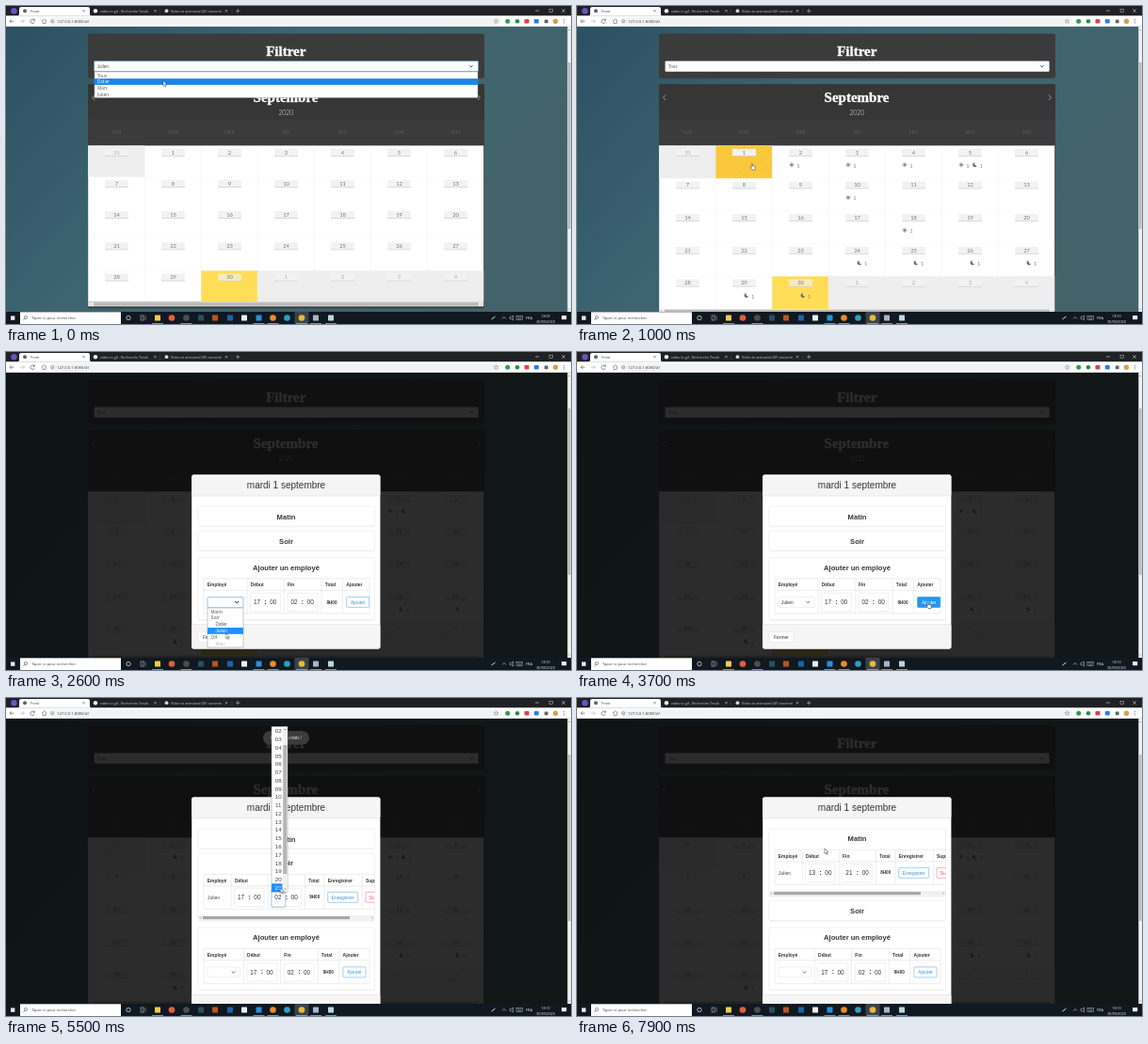
Write an HTML page that moves like this. It is 600x338 px and loops after 8 s.

```html
<!DOCTYPE html>
<html lang="fr">
<head>
<meta charset="utf-8">
<title>Front</title>
<style>
  html, body { margin: 0; width: 100%; height: 100%; overflow: hidden; background: #35545f; }
  svg { display: block; width: 600px; height: 338px; }
  text { font-family: "Open Sans", sans-serif; white-space: pre; }
  .cal text { font-family: Lato, sans-serif; }
  .cal .title { font-family: "Liberation Serif", serif; font-weight: 700; stroke: #fff; stroke-width: .35px; }
  .modal text, .pick text { font-family: "Liberation Sans", sans-serif; }
  #modal { transform-origin: 297.5px 223px; }
</style>
</head>
<body>
<svg id="stage" viewBox="0 0 600 338" xmlns="http://www.w3.org/2000/svg"></svg>
<script>
const LOOP = 8000;
const MID = 'text-anchor="middle"', BOLD = 'font-weight="700"';
const BLUE = '#1e90ff', LINK = '#3298dc', LINE = '#dbdbdb';
const people = { late: 'Julien', early: 'Didier', off: 'Marc' };

const rect = (x, y, w, h, fill, more = '') =>
  `<rect x="${x}" y="${y}" width="${w}" height="${h}" fill="${fill}" ${more}/>`;
const text = (x, y, s, size, fill, more = '') =>
  `<text x="${x}" y="${y}" font-size="${size}" fill="${fill}" ${more}>${s}</text>`;
const disc = (x, y, r, fill, more = '') => `<circle cx="${x}" cy="${y}" r="${r}" fill="${fill}" ${more}/>`;
const line = (d, color, w = 0.6, more = '') =>
  `<path d="${d}" fill="none" stroke="${color}" stroke-width="${w}" ${more}/>`;
const frame = (x, y, w, h, color, fill = 'none', more = '') =>
  rect(x, y, w, h, fill, `stroke="${color}" stroke-width=".45" ${more}`);
const cross = (x, y, r, color) => line(`M${x - r} ${y - r}l${2 * r} ${2 * r}m0 ${-2 * r}l${-2 * r} ${2 * r}`, color);
const chevron = (x, y, color) => line(`M${x - 1.8} ${y - 0.9}l1.8 1.8l1.8 -1.8`, color, 0.9);
const during = (a, b, body) => `<g data-on="${a} ${b}">${body}</g>`;

/* ---- browser window ---- */
function browser() {
  const pale = '#c4c7ca', grey = '#5f6368';
  let s = rect(0, 0, 600, 10.5, '#202124') + rect(0, 10.3, 600, 11.5, '#fff')
    + `<path d="M12 10.5q2 0 2-2v-5.5q0-2 2-2h71q2 0 2 2v5.5q0 2 2 2z" fill="#fff"/>`
    + disc(8.5, 5.2, 3.2, '#6b52c8') + disc(20, 5.2, 2, grey)
    + text(26, 6.7, 'Front', 3.8, '#3c4043')
    + disc(95, 5.2, 2.2, '#f0f0f0') + text(100, 6.7, 'video to gif - Recherche Trovik', 3.7, pale)
    + disc(170.5, 5.2, 1.9, '#d6d6d6') + text(175, 6.7, 'Video to animated GIF converte', 3.7, pale)
    + cross(82.5, 5.2, 1.2, grey) + cross(158.5, 5.2, 1.2, pale) + cross(234, 5.2, 1.2, pale)
    + line('M163.500 3v5M240 3v5', '#55585c', 0.4)
    + line('M244 5.200h4.400M246.200 3v4.400', pale)
    + line('M562 5h4', '#ddd') + frame(577, 3.2, 3.4, 3.4, '#ddd') + cross(592, 5, 1.7, '#ddd');
  s += line('M8.500 16.200h-4.500m2-2l-2 2l2 2', grey, 0.7)
    + line('M15 16.200h4.500m-2-2l2 2l-2 2', '#b8babd', 0.7)
    + line('M30 15a2.200 2.200 0 1 0 .3 2M30.400 13.500v1.800h-1.800', grey, 0.7)
    + line('M38 16l2.600-2.300l2.600 2.300M39 15.500v3h3.200v-3', grey, 0.6)
    + rect(46, 12, 480, 8.4, '#f1f3f4', 'rx="4.2"')
    + disc(49.3, 16.2, 1.6, 'none', `stroke="${grey}" stroke-width=".5"`) + line('M49.300 15.900v1.200', grey, 0.5)
    + text(54, 17.8, '127.0.0.1:8080/#/', 4.2, '#3c4043')
    + `<path d="M520.500 13.800l.7 1.600 1.700.1-1.300 1.100.4 1.700-1.500-.9-1.500.9.4-1.700-1.300-1.100 1.700-.1z" fill="none" stroke="${grey}" stroke-width=".4"/>`
    + disc(532.7, 16.2, 2.5, '#2f9e4c') + disc(543, 16.2, 2.3, '#2c8a45')
    + rect(550.500, 14, 5, 4.600, '#e0404a', 'rx="1"') + rect(560.8, 14, 5, 4.6, '#2d7cf0', 'rx="1"')
    + rect(571.8, 14.4, 3.8, 3.8, grey, 'rx=".6"') + disc(583.5, 16.2, 2.7, '#d2a24c')
    + [14.5, 16.2, 17.9].map(y => disc(592.5, y, 0.5, grey)).join('');
  return s;
}

/* ---- taskbar ---- */
function taskbar() {
  const pale = '#d9dde0';
  let s = rect(0, 325, 600, 13, '#101820') + rect(5, 329.4, 4.4, 4.4, '#e6eaed')
    + rect(15, 325.3, 107, 12.7, '#fff')
    + disc(21, 331, 1.6, 'none', 'stroke="#333" stroke-width=".5"') + line('M19.800 332.300l-1.400 1.500', '#333')
    + text(27, 333.3, 'Taper ici pour rechercher', 4.05, '#444')
    + disc(130, 331.5, 2.2, 'none', 'stroke="#eee" stroke-width=".7"')
    + frame(143, 330, 3.4, 3, pale) + line('M142.500 328.800h4.500M142.500 334.200h4.500M148.200 329v5', pale, 0.4)
    + rect(306.500, 325, 15, 13, '#39434c');
  const apps = [
    [161, '#f6c94c', 0], [176, '#e0603a', 1], [191.500, '#4a4d50', 1], [207, '#28505f', 0], [222, '#b8561f', 0],
    [238, '#1c64a8', 0], [253, '#e9eff2', 0], [268.500, '#2a8fd8', 0], [283.500, '#f28a24', 1], [298.500, '#2f9fc0', 1],
    [314, '#e8b93a', 1], [329, '#aab4c8', 0], [345, '#bcd6dc', 0]
  ];
  for (const [x, color, round] of apps)
    s += round ? disc(x, 331.5, 3.3, color) : rect(x - 3, 328.5, 6, 6, color, 'rx=".5"');
  for (const x of [161, 191.500, 268.500, 283.500, 314, 329, 345]) s += rect(x - 6, 337.2, 12, 0.8, '#76b9ed');
  s += line('M515.500 333l4-3', pale, 1) + line('M527 332.500l2-2l2 2', pale)
    + line('M535 330.300h2l1.500-1.300v5l-1.500-1.300h-2z', pale, 0.5)
    + frame(542, 329.6, 6.5, 3.8, pale) + line('M543 331h4.500M543.500 332.300h3.500', pale, 0.4)
    + text(552, 333, 'FRA', 3.9, '#eee')
    + during(0, 500, text(573, 330.6, '18:09', 3.7, '#eee', MID))
    + during(500, LOOP, text(573, 330.6, '18:10', 3.7, '#eee', MID))
    + text(573, 336.6, '30/09/2020', 3.7, '#eee', MID)
    + rect(590, 329, 5.2, 4.2, '#eee');
  return s;
}

/* ---- calendar page ---- */
const SIDE = 87.2, TOP = 148.5, WIDTH = 420;
const sun = (x, y) => disc(x, y, 1.5, '#8a8a8a')
  + disc(x, y, 2.1, 'none', 'stroke="#8a8a8a" stroke-width=".8" stroke-dasharray=".9 .75"');
const moon = (x, y) => `<path d="M${x} ${y - 2.5}a2.500 2.500 0 1 0 2.400 3.700a2.600 2.600 0 0 1 -2.400 -3.700z" fill="#6f6f6f"/>`;
const left = col => SIDE + 60 * col;

function shiftMark(cell, top, night, shift = 0) {
  const x = left(cell % 7) + (night ? 32.6 : 20.8) + shift, y = top + 20.3;
  return (night ? moon : sun)(x, y) + text(x + 5.4, y + 2.9, '1', 5, '#777');
}

function grid(pitch, marks) {
  const top = cell => TOP + pitch * Math.floor(cell / 7);
  let s = rect(SIDE, TOP, WIDTH, pitch * 5, '#fff');
  for (let i = 0; i < 35; i++) {
    const x = left(i % 7), y = top(i);
    const other = i === 0 || i > 30, today = i === 30;
    const n = i === 0 ? 31 : i > 30 ? i - 30 : i;
    if (other || today) s += rect(x, y, 60, pitch, today ? '#ffdd57' : '#eeeeee');
    if (i === 1 && marks) s += during(800, 1400, rect(x, y, 60, pitch, 'url(#stripes)'));
    s += line(`M${x} ${y}v${pitch}`, '#e4e4e4', 0.4) + line(`M${x} ${y}h60`, '#f2f2f2', 0.3)
      + rect(x + 17.8, y + 3.2, 25, 7.8, today ? '#f5eabf' : '#f2f2f2', 'rx=".8"')
      + rect(x + 17.8, y + 10.5, 25, 0.6, '#c9c9c9')
      + text(x + 30.3, y + 9.1, n, 5.8, other ? '#a9a9a9' : '#777', MID);
  }
  if (marks) {
    for (const i of [2, 3, 4, 5, 10, 18]) s += shiftMark(i, top(i), false);
    for (const i of [24, 25, 26, 27, 29, 30]) s += shiftMark(i, top(i), true);
    s += shiftMark(5, top(5), true, 2.6) + during(3800, 7500, shiftMark(1, top(1), true));
  }
  const end = TOP + pitch * 5;
  return s + rect(SIDE, end, WIDTH, 4.8, '#f1f1f1') + rect(93, end + 0.7, 409, 3.4, '#b9b9b9')
    + line(`M90.500 ${end + 1.4}l-1 1l1 1M504.500 ${end + 1.4}l1 1l-1 1`, '#777', 0.5);
}

function filterList() {
  const names = ['Tous', people.early, people.off, people.late];
  const row = i => 70.3 + 6.85 * i;
  const hot = (i, a, b) => during(a, b, rect(94, row(i), 407, 6.7, '#1a84e8') + text(97, row(i) + 5.2, names[i], 4.7, '#fff'));
  return frame(93.8, 58.6, 407.500, 11, '#3f8fe0') + frame(94, 70, 407, 27.5, '#999', '#fff')
    + names.map((n, i) => text(97, row(i) + 5.2, n, 4.7, '#555')).join('')
    + hot(1, 0, 200) + hot(0, 200, 400);
}

function page() {
  const days = ['LUN', 'MAR', 'MER', 'JEU', 'VEN', 'SAM', 'DIM'];
  return rect(0, 21.8, 600, 303.5, 'url(#sea)')
    + `<g class="cal">`
    + rect(87, 29.5, 421, 47, '#3b3a3a', 'rx="2" filter="url(#soft)"')
    + text(297.3, 52.7, 'Filtrer', 15, '#fff', `class="title" ${MID}`)
    + rect(93.6, 58.5, 408, 11.2, '#fff', 'rx="1"')
    + during(0, 400, text(97, 66, people.late, 4.7, '#555'))
    + during(400, LOOP, text(97, 66, 'Tous', 4.7, '#666'))
    + chevron(494, 64.2, '#2b4b7a')
    + rect(87, 83, 421, 238, '#3b3a3a', 'rx="2" filter="url(#soft)"')
    + rect(87, 83, 421, 38, '#373636', 'rx="2"') + rect(87, 120.500, 421, 28.5, '#3c3b3b')
    + text(297, 102.2, 'Septembre', 15, '#fff', `class="title" ${MID}`)
    + text(297.3, 115.8, '2020', 6.8, '#f4f4f4', `${MID} font-weight="300"`)
    + line('M94.200 94.500l-2.700 2.800l2.700 2.800M500.800 94.500l2.700 2.800l-2.700 2.800', '#999', 1)
    + days.map((d, i) => text(left(i) + 30.2, 136, d, 4.9, '#5b5b5b', MID)).join('')
    + during(0, 400, grid(33.2, false)) + during(400, LOOP, grid(34.7, true))
    + `</g>`
    + during(0, 400, filterList())
    + `<g id="dim">${rect(0, 21.8, 600, 303.5, '#0a0a0a', 'fill-opacity=".86"')}</g>`
    + rect(596.3, 21.8, 3.7, 303.5, '#f1f1f1') + rect(596.8, 60, 2.8, 177, '#bdbdbd')
    + line('M597.200 26l1-1l1 1M597.200 321.500l1 1l1-1', '#666', 0.5);
}

/* ---- dialog ---- */
const panel = (y, h) => frame(204, y, 187.5, h, '#e6e6e6', '#fff', 'rx="1.5" filter="url(#faint)"');
const heading = (y, s) => text(297.5, y, s, 7.6, '#363636', `${MID} ${BOLD}`);

const clock = (x, cy, h, w = 32) => frame(x, cy - 9.7, w, 19.4, LINE, '#fff', 'rx="1"')
  + text(x + 7, cy + 2.4, h, 6.4, '#363636', MID) + text(x + 16, cy + 1.8, ':', 7, '#363636', `${MID} ${BOLD}`)
  + text(x + 24.3, cy + 2.4, '00', 6.4, '#363636', MID);

const button = (x, cy, w, label, color, solid) =>
  frame(x, cy - 5.5, w, 11, color, solid ? color : '#fff', 'rx="1"')
  + text(x + w / 2, cy + 1.8, label, 4.9, solid ? '#fff' : color, MID);

function table(y, edges, right, heads) {
  let s = line(`M${edges[0]} ${y}H${right}M${edges[0]} ${y + 12.5}H${right}M${edges[0]} ${y + 37}H${right}`, LINE, 0.5);
  edges.forEach((x, i) => {
    s += line(`M${x} ${y}v37`, LINE, 0.5);
    if (heads[i]) s += text(x + 3.8, y + 8.2, heads[i], 4.9, '#363636', BOLD);
  });
  return s;
}

function shiftPanel(y, title, plan) {
  if (!plan) return panel(y, 21) + heading(y + 13.6, title);
  const [from, to, total] = plan, cy = y + 46.8;
  return panel(y, 71.5) + heading(y + 13.2, title)
    + `<g clip-path="url(#body)">`
    + table(y + 22.3, [210, 239.2, 278.3, 317.5, 338, 378.3], 392, ['Employé', 'Début', 'Fin', 'Total', 'Enregistrer', 'Supprimer'])
    + text(214, cy + 1.7, people.late, 5, '#4a4a4a')
    + clock(242.6, cy, from, 31.5) + clock(281.9, cy, to, 31.5)
    + text(327.7, cy + 1.6, total, 4.6, '#363636', `${MID} ${BOLD}`)
    + button(341.7, cy, 32, 'Enregistrer', LINK) + button(382, cy, 30, 'Supprimer', '#f14668')
    + `</g>`
    + rect(204, y + 66, 187.5, 5.2, '#f1f1f1') + rect(209, y + 67, 156, 3.2, '#a8a8a8')
    + line(`M207 ${y + 67.6}l-1 1l1 1M388.500 ${y + 67.6}l1 1l-1 1`, '#555', 0.5);
}

function addPanel(y, wide, extra) {
  const d = wide ? 3.7 : 0, cy = y + 47.4;
  return panel(y, 66) + heading(y + 13, 'Ajouter un employé')
    + table(y + 22.3, [210, 252.3 + d, 291.5 + d, 331.3 + d, 353.800 + d, 386], 386, ['Employé', 'Début', 'Fin', 'Total', 'Ajouter'])
    + frame(214, cy - 5.5, 34.5 + d, 11, LINE, '#fff', 'rx="1"') + chevron(241.5 + d, cy, '#3a62b8')
    + clock(255.8 + d, cy, '17') + clock(295.3 + d, cy, '02')
    + text(342.3 + d, cy + 1.6, '9H00', 4.6, '#363636', `${MID} ${BOLD}`)
    + button(358 + d, cy, 24, 'Ajouter', LINK) + extra(cy);
}

function dialog(top, h, morning, evening, wide, extra) {
  const soir = top + 33.5 + (morning ? 76.5 : 26), add = soir + (evening ? 79 : 28.5);
  const x = 197.2, w = 200.2, foot = add + 71;
  return rect(x, top, w, h, '#fff', 'rx="2"')
    + rect(x, top, w, 22.5, '#f5f5f5', 'rx="2"') + line(`M${x} ${top + 22.5}h${w}`, LINE, 0.5)
    + text(297.5, top + 14.6, 'mardi 1 septembre', 10, '#363636', MID)
    + shiftPanel(top + 33.5, 'Matin', morning) + shiftPanel(soir, 'Soir', evening)
    + addPanel(add, wide, extra)
    + rect(x, foot, w, top + h - foot, '#f5f5f5', 'rx="2"') + line(`M${x} ${foot}h${w}`, LINE, 0.5)
    + frame(204, foot + 8, 26, 11, LINE, '#fff', 'rx="1"') + text(217, foot + 15.3, 'Fermer', 4.9, '#363636', MID);
}

function staffList() {
  const rows = [['Matin', 0], ['Soir', 0], [people.early, 1], [people.late, 1], ['Off', 0], [people.off, 1]];
  const row = i => 272.3 + 6.9 * i;
  const hot = (i, a, b) => during(a, b, rect(214, row(i), 38, 6.8, BLUE) + text(222.5, row(i) + 5.2, rows[i][0], 4.7, '#fff'));
  return `<g class="pick">` + frame(214, 260.6, 38, 11.3, '#3f8fe0', 'none', 'rx="1"') + chevron(245.2, 266, '#222')
    + frame(214, 272, 38, 42, '#888', '#fff')
    + rows.map(([s, deep], i) => text(deep ? 222.5 : 217.5, row(i) + 5.2, s, 4.7,
        i === 5 ? '#bbb' : deep ? '#555' : '#8a8a8a', deep ? '' : BOLD)).join('')
    + hot(2, 2500, 2600) + hot(3, 2600, 2800) + `</g>`;
}

const STEP = 8.77;
const hour = n => String(n).padStart(2, '0');

function hourList(x, first, hot) {
  const label = (i, color) => text(x + 7.2, 37.2 + STEP * i, hour(i + first), 6.2, color, MID);
  let s = frame(x, 30.3, 17, 176, '#888', '#fff');
  for (let i = 0; i < 20; i++) s += label(i, '#444');
  for (const [n, a, b] of hot)
    s += during(a, b, rect(x, 30.6 + STEP * (n - first), 11.5, STEP, BLUE) + label(n - first, '#fff'));
  s += rect(x + 11.8, 30.600, 5, 175.4, '#f1f1f1') + rect(x + 12.2, 36 + 7 * first, 4.2, 137, '#b5b5b5')
    + line(`M${x + 13.3} 34l1-1l1 1M${x + 13.3} 202.500l1 1l1-1`, '#555', 0.6);
  return `<g class="pick">${frame(x, 203, 14.500, 19.4, '#3f8fe0', 'none', 'rx="1"')}${s}</g>`;
}

function modal() {
  const plain = () => '';
  const chosen = cy => during(2800, 3800, text(217, cy + 1.7, people.late, 4.9, '#363636'))
    + during(3400, 3800, button(361.7, cy, 24, 'Ajouter', '#2196f3', true));
  const pressed = cy => during(3800, 4700, button(358, cy, 24, 'Ajouter', '#2196f3', true));
  return `<g id="modal" class="modal">`
    + during(1200, 3800, dialog(130.5, 185, null, null, true, chosen))
    + during(3800, 5800, dialog(105.5, 236, null, ['17', '02', '9H00'], false, pressed))
    + during(5800, 7500, dialog(105.5, 236, null, ['17', '21', '4H00'], false, plain))
    + during(7500, LOOP, dialog(105.5, 236, ['13', '21', '8H00'], null, false, plain))
    + `</g>`
    + `<g id="toast">${rect(273, 35, 49, 14.5, '#3b3b3b', 'rx="7.2"')}${text(297.500, 43.900, 'Horaires créés !', 4.5, '#f2f2f2', MID)}</g>`
    + during(2400, 2800, staffList())
    + during(4700, 5200, hourList(282, 0, [[2, 4700, 5000], [19, 5000, 5200]]))
    + during(5200, 5800, hourList(282, 2, [[20, 5200, 5300], [21, 5300, 5800]]))
    + during(6500, 7500, hourList(243, 0, [[17, 6500, 6900], [16, 6900, 7000], [15, 7000, 7100], [14, 7100, 7300], [13, 7300, 7500]]));
}

function pointer() {
  const arrow = `<path d="M0 0v5.600l1.300-1.200.9 2 .9-.4-.9-2h1.800z" fill="#fff" stroke="#222" stroke-width=".45"/>`;
  const hand = `<path d="M-.7 3.600v-3q.6-.9 1.200 0v2l2.600.5q.6.300.5 1l-.5 2.400h-3.200l-1.900-2.500q.3-1 1.300-.4z" fill="#fff" stroke="#222" stroke-width=".5"/>`;
  const hands = [[700, 1900], [3400, 4700], [6200, 6500]];
  let s = '', t = 0;
  for (const [a, b] of hands) {
    s += during(t, a, arrow) + during(a, b, hand);
    t = b;
  }
  return `<g id="pointer">${s}${during(t, LOOP, arrow)}</g>`;
}

const shadow = (id, o) => `<filter id="${id}" x="-5%" y="-20%" width="110%" height="150%">
  <feDropShadow dx="0" dy=".5" stdDeviation=".7" flood-opacity="${o}"/></filter>`;
const defs = `<defs>
  <linearGradient id="sea" x1="0" y1="0" x2="1" y2=".45"><stop offset="0" stop-color="#2d5062"/><stop offset=".45" stop-color="#3d6571"/><stop offset="1" stop-color="#43636b"/></linearGradient>
  <pattern id="stripes" width="2.2" height="2.2" patternUnits="userSpaceOnUse" patternTransform="rotate(45)"><rect width="2.2" height="2.2" fill="#ffdc50"/><rect width="1.1" height="2.2" fill="#f9b326"/></pattern>
  <clipPath id="body"><rect x="204" y="106" width="187.500" height="220"/></clipPath>
  ${shadow('soft', 0.22)}${shadow('faint', 0.12)}
</defs>`;

const stage = document.getElementById('stage');
stage.innerHTML = defs + page() + modal() + browser() + taskbar() + pointer();

/* ---- timing: keyframes stepping every 100 ms ---- */
let rules = '', count = 0;
function track(el, points, css, smooth = true) {
  const name = 'k' + count++;
  const all = [...points, [LOOP, ...points[points.length - 1].slice(1)]];
  rules += `@keyframes ${name}{` + all.map(([t, ...v], i) => {
    const next = all[i + 1], n = smooth && next ? Math.max(1, (next[0] - t) / 100) : 1;
    return `${t / LOOP * 100}%{${css(...v)};animation-timing-function:steps(${n})}`;
  }).join('') + '}';
  el.style.animation = `${name} ${LOOP}ms infinite`;
}

const fade = o => `opacity:${o}`;
for (const el of stage.querySelectorAll('[data-on]')) {
  const [a, b] = el.dataset.on.split(' ').map(Number);
  const points = a ? [[0, 0], [a, 1]] : [[0, 1]];
  if (b < LOOP) points.push([b, 0]);
  track(el, points, fade, false);
}

const byId = id => document.getElementById(id);
track(byId('dim'), [[0, 0], [1200, 0], [1500, 1]], fade);
track(byId('modal'), [[0, 0, 1.1], [1200, 0, 1.1], [1500, 1, 1]], (o, z) => `opacity:${o};transform:scale(${z})`);
track(byId('toast'), [[0, 0, -12], [3800, 0, -12], [4000, 1, 0], [6600, 1, 0], [6900, 0, 0]],
  (o, y) => `opacity:${o};transform:translateY(${y}px)`);
track(byId('pointer'), [
  [0, 167, 79.500], [100, 167, 79.500], [200, 163, 74], [400, 163, 74], [900, 186, 167.5], [1700, 186, 167.5],
  [2300, 232, 266], [2400, 232, 267], [2600, 233.500, 299], [2900, 233.500, 299], [3500, 373, 266], [3800, 373, 266],
  [4400, 291.500, 211.5], [4800, 291.500, 211.5], [5000, 291.5, 199], [5500, 291.5, 202], [5900, 291.5, 202],
  [6400, 250, 211.5], [6700, 250, 211.5], [7100, 250.500, 155], [7200, 250.500, 155], [7300, 251, 149],
  [7500, 251, 149], [7800, 263, 160]
], (x, y) => `transform:translate(${x}px,${y}px)`);

const sheet = document.createElement('style');
sheet.textContent = rules;
document.head.append(sheet);
</script>
</body>
</html>
```
